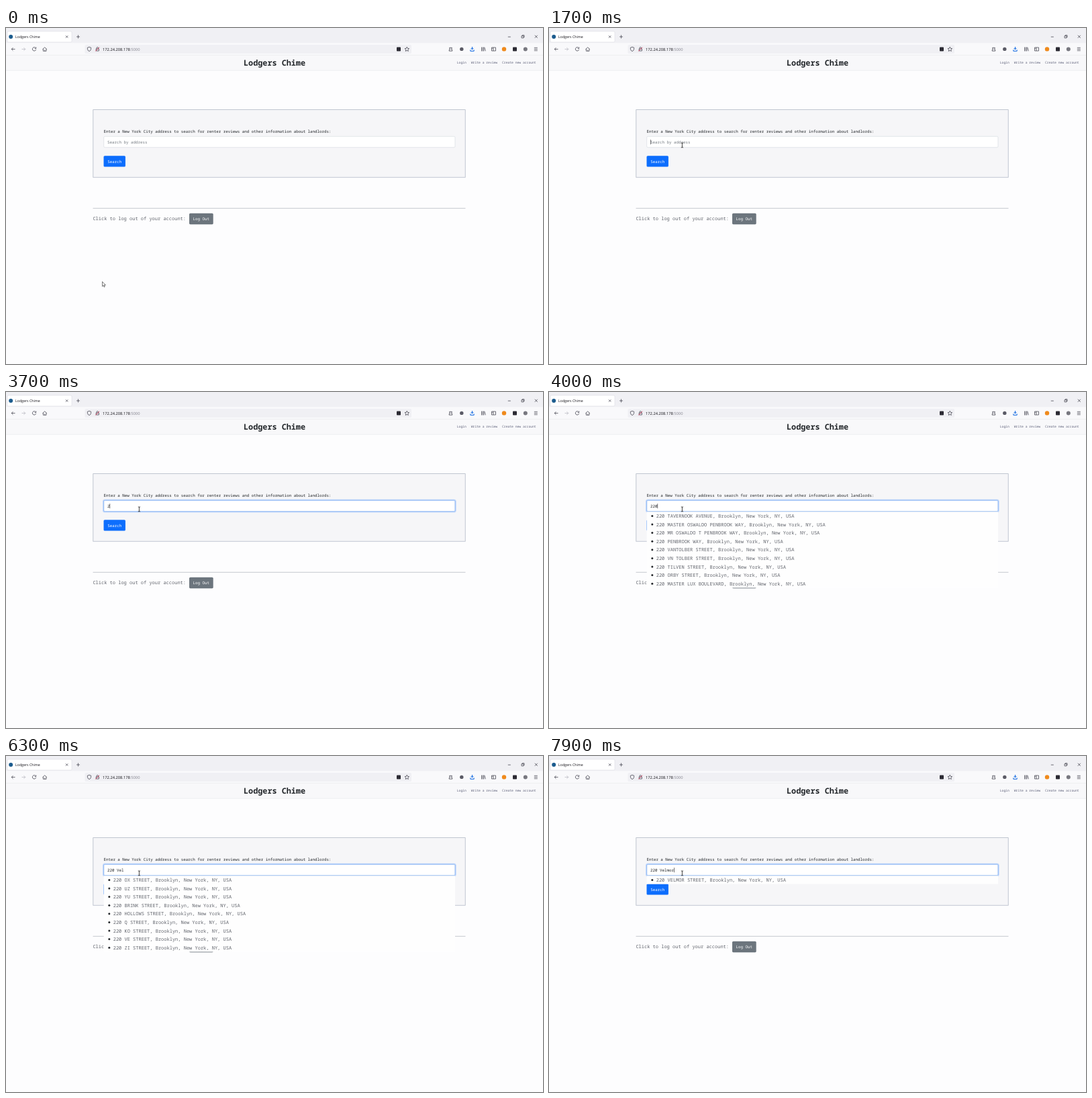
Recreate the animation shown at these times as an HTML page. Size 800x500 px, loop 8000 ms.

```html
<!DOCTYPE html>
<html lang="en">
<head>
<meta charset="utf-8">
<title>Lodgers Chime</title>
<style>
  html, body { margin: 0; width: 100%; height: 100%; overflow: hidden; background: #fdfdfe; }
  svg { display: block; width: 800px; height: 500px; }
  text { white-space: pre; text-rendering: geometricPrecision; font-family: "Noto Sans Mono", monospace; }
  .ui { font-family: "Open Sans", sans-serif; font-size: 5.75px; fill: #15141a; }
  .small { font-size: 5.84px; fill: #212529; }
  .body { font-size: 7px; fill: #62656d; }
  .nav { font-size: 4.7px; fill: #5c5f78; }
  .line { fill: none; stroke: #4a4a55; stroke-width: .8; }
</style>
</head>
<body>
<svg viewBox="0 0 800 500">
  <!-- tab strip -->
  <rect width="800" height="22.5" fill="#f0f0f4"/>
  <rect x="2" y="5" width="96" height="16" rx="1.7" fill="#fff" stroke="#d5d5dc" stroke-width=".5"/>
  <circle cx="7.2" cy="13" r="3" fill="#1c5c8e"/>
  <text class="ui" x="13.8" y="15" style="font-size:5.3px">Lodgers Chime</text>
  <g class="line">
    <path d="M89 11.4l3.2 3.2m0-3.2l-3.2 3.2M105 13h5m-2.5-2.5v5"/>
    <path d="M747.8 13.2h4M768 11.8h3v3h-3zM769 11.8v-1h3v3h-1M787.8 10.8l4 4m0-4l-4 4"/>
  </g>

  <!-- toolbar -->
  <rect y="22.5" width="800" height="18" fill="#f9f9fb"/>
  <rect x="117.5" y="25" width="486.5" height="13" rx="1.7" fill="#f0f0f4"/>
  <g class="line">
    <path d="M13.5 31.5h-5.3m2.3-2.3l-2.3 2.3l2.3 2.3"/>
    <path stroke="#bcbcc4" d="M23.5 31.5h5.3m-2.3-2.3l2.3 2.3l-2.3 2.3"/>
    <path d="M44.2 29.7a2.7 2.7 0 1 0 .5 2.3M44.8 28.5v2h-2"/>
    <path d="M54.5 31.7l3.2-2.9l3.2 2.9M55.4 31v3.3h4.6v-3.3M57.7 34.3v-1.8"/>
    <path d="M124 28.3l2.6 .9v2.2q0 2-2.6 3.3q-2.6-1.3-2.6-3.3v-2.2z"/>
    <path d="M134.2 31h4.2v3h-4.2zM135 31v-1.2a1.3 1.3 0 0 1 2.6 0v1.2"/>
    <path stroke="#e22850" d="M133.4 34.5l5.7-5.8"/>
    <path d="M597.3 28.2l1 2.1l2.3 .3l-1.7 1.6l.4 2.3l-2-1.1l-2 1.1l.4-2.3l-1.7-1.6l2.3-.3z"/>
    <path d="M660.2 34.2v-1.8h1.1v-1.8h-.6v-1.3h3.6v1.3h-.6v1.8h1.1v1.8z"/>
    <path stroke="#0561e0" stroke-width="1" d="M694.5 28v4m-1.9-1.9l1.9 1.9l1.9-1.9M691.8 32.5v1.8h5.4v-1.8"/>
    <path d="M708.5 28.5v6m1.7-6v6m1.6-6v6m1-5.8l1.5 5.6"/>
    <path d="M723.5 29h6v5h-6zM726 29v5M724.3 30.6h1"/>
    <path d="M786.8 29.3h5m-5 2.2h5m-5 2.2h5"/>
  </g>
  <text class="ui" x="144" y="33.7">172.24.208.178<tspan fill="#85858e">:5000</tspan></text>
  <rect x="582" y="28.5" width="6" height="6" rx=".8" fill="#2b2a33"/>
  <circle cx="678.8" cy="31.4" r="2.7" fill="#5b5b66"/>
  <circle cx="742" cy="31.4" r="3.2" fill="#ef8a1d"/>
  <rect x="755" y="28.5" width="6" height="6" rx=".8" fill="#2b2a33"/>
  <circle cx="773.8" cy="31.4" r="3" fill="#77777f"/>

  <!-- site header -->
  <rect y="40.5" width="800" height="22.5" fill="#f8f8fa"/>
  <path d="M0 40.4h800M0 63.2h800" stroke="#e6e7ea" stroke-width=".6"/>
  <text x="354" y="56" font-size="11.8" font-weight="600" fill="#212529">Lodgers Chime</text>
  <text class="nav" x="671.8" y="53.2">Login</text>
  <text class="nav" x="692.8" y="53.2">Write a review</text>
  <text class="nav" x="739" y="53.2">Create new account</text>

  <!-- search card -->
  <rect x="129.8" y="121.6" width="554.4" height="100.6" fill="#f6f6f8" stroke="#b2bac6" stroke-width=".8"/>
  <text class="small" x="145.4" y="156">Enter a New York City address to search for renter reviews and other information about landlords:</text>
  <rect x="145.7" y="161.3" width="523.3" height="16.4" rx="1.6" fill="#fff" stroke="#d3d8de" stroke-width=".6"/>
  <g id="ring" fill="none">
    <rect x="144.9" y="160.5" width="524.9" height="18" rx="2.3" stroke="#0d6efd" stroke-opacity=".25" stroke-width="1.7"/>
    <rect x="145.7" y="161.3" width="523.3" height="16.4" rx="1.6" stroke="#86b7fe" stroke-width=".7"/>
  </g>
  <text class="small" id="field" x="151" y="171.7"></text>
  <rect id="caret" y="166.2" width=".6" height="7" fill="#15141a"/>
  <rect x="145.5" y="190.2" width="32.4" height="16.4" rx="1.6" fill="#0d6efd"/>
  <text class="small" x="151.2" y="200.6" style="fill:#fff">Search</text>

  <!-- log out -->
  <path d="M129.5 268.3h555" stroke="#b9bcc4" stroke-width=".8"/>
  <text class="body" x="129.4" y="285.6">Click to log out of your account:</text>
  <rect x="273" y="275.8" width="35.7" height="16.4" rx="1.6" fill="#6c757d"/>
  <text class="small" x="278.5" y="286.3" style="fill:#fff">Log Out</text>

  <g id="menu"></g>

  <path id="arrow" d="M0 0v7l1.6-1.5l1.1 2.5l1.1-.5l-1.1-2.4h2.2z" fill="#fff" stroke="#222" stroke-width=".6"/>
  <path id="beam" d="M-1.6-3.3h1.2l.4 .4l.4-.4h1.2M0-2.9v6M-1.6 3.5h1.2l.4-.4l.4 .4h1.2" fill="none" stroke="#111" stroke-width=".8"/>
</svg>
<script>
const LOOP = 8000, FOCUS = 1700;
const $ = id => document.getElementById(id);

const streets = [
  ["TAVERNOOK AVENUE", "MASTER OSWALDO PENBROOK WAY", "MR OSWALDO T PENBROOK WAY",
   "PENBROOK WAY", "VANTOLBER STREET", "VN TOLBER STREET", "TILVEN STREET",
   "ORBY STREET", "MASTER LUX BOULEVARD"],
  ["OX", "UZ", "YU", "BRINK", "HOLLOWS", "Q", "KO", "VE", "ZI"].map(s => s + " STREET"),
  ["VELMOR STREET"]
];
const typed = "220 Velmor";
const keyTimes = [3700, 3800, 3900, 4800, 5000, 5200, 5800, 6600, 6900, 7500];
const menuTimes = [3900, 6100, 7000];

// pointer stops: time, x, y
const path = [[100, 143.5, 377.5], [300, 150, 422], [900, 196, 190], [1100, 198.4, 174.3]];

const menus = streets.map(list => {
  const rows = list.map((street, i) => {
    const y = 184.4 + 12.6 * i;
    return `<circle cx="153.8" cy="${y}" r="1.5" fill="#24272b"/>
      <text class="body" x="159.7" y="${y + 2.5}">220 ${street}, Brooklyn, New York, NY, USA</text>`;
  }).join("");
  return `<g><rect x="145.7" y="178.2" width="523.3" height="${12.6 * list.length - .2}" fill="#fefefe"/>
    <path d="M145.7 178.2h523.3" stroke="#d3dcec" stroke-width=".5"/>${rows}</g>`;
});
$("menu").innerHTML = menus.join("");
const menuNodes = [...$("menu").children];

const show = (node, on) => node.setAttribute("visibility", on ? "visible" : "hidden");
const passed = (times, t) => times.filter(k => k <= t).length;
const ease = p => p * p * (3 - 2 * p);

function pointerAt(t) {
  if (t <= path[0][0]) return path[0].slice(1);
  const i = path.findIndex(p => p[0] > t);
  if (i < 0) return path[path.length - 1].slice(1);
  const [a, b] = [path[i - 1], path[i]];
  const p = ease((t - a[0]) / (b[0] - a[0]));
  return [a[1] + (b[1] - a[1]) * p, a[2] + (b[2] - a[2]) * p];
}

function caretOn(t, count) {
  if (t < FOCUS) return false;
  if (!count) return t < FOCUS + 500;
  return (t - keyTimes[count - 1]) % 1000 < 500;
}

function draw(now) {
  const t = now % LOOP;
  const count = passed(keyTimes, t);
  const field = $("field");
  field.textContent = count ? typed.slice(0, count) : "Search by address";
  field.style.fill = count ? "#212529" : "#767c83";
  $("caret").setAttribute("x", 151 + count * 3.504);
  show($("caret"), caretOn(t, count));
  $("ring").setAttribute("opacity", Math.min(1, Math.max(0, (t - FOCUS) / 150)));

  const open = passed(menuTimes, t) - 1;
  menuNodes.forEach((node, i) => show(node, i === open));

  const [x, y] = pointerAt(t);
  const inField = y < 178;
  for (const id of ["arrow", "beam"]) $(id).setAttribute("transform", `translate(${x} ${y})`);
  show($("arrow"), !inField);
  show($("beam"), inField);
}

function tick() {
  draw(performance.now());
  requestAnimationFrame(tick);
}
tick();
</script>
</body>
</html>
```
